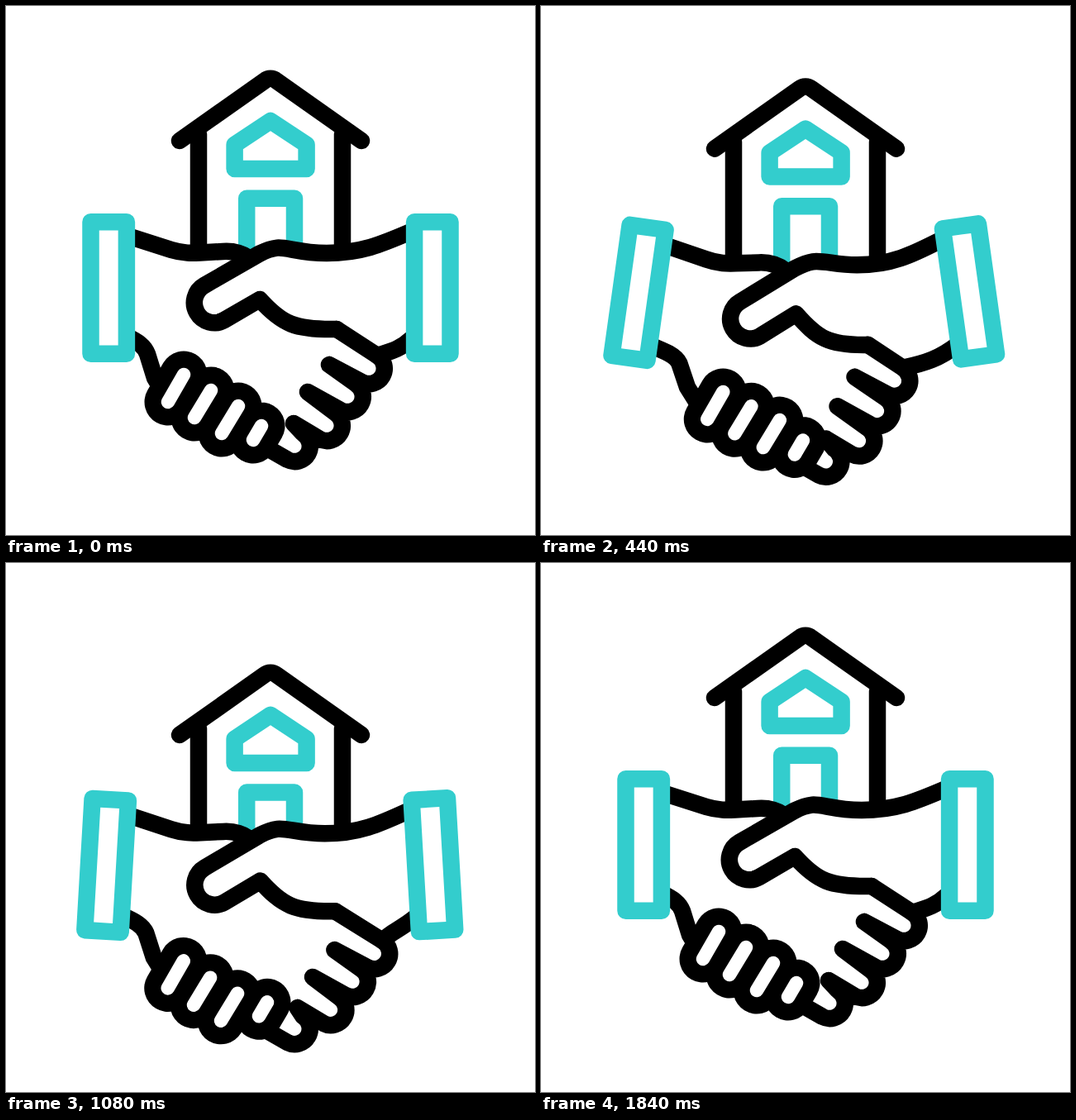
Recreate the animation shown at these times as an HTML page. Size 640 px wide and 640 px high, loop 1960 ms.

```html
<!DOCTYPE html>
<html lang="en">
<head>
<meta charset="utf-8">
<title>Handshake in front of a house</title>
<style>
  html, body { margin: 0; height: 100%; overflow: hidden; background: #fff; }
  svg { display: block; width: 100%; height: 100%; }
  svg * { stroke-linecap: round; stroke-linejoin: round; }
  .ink, .accent { fill: none; stroke: #000; stroke-width: 20.5; }
  .accent { stroke: #33cdcd; }
  .solid { fill: #fff; }
  .outer { stroke: #000; stroke-width: 57; }
  .inner { stroke: #fff; stroke-width: 16.5; }
</style>
</head>
<body>
<svg viewBox="0 0 640 640">
  <g id="house">
    <path class="ink" d="M233 155V312M407 155V312"/>
    <path class="ink" d="M210 163L313 90.3C317 87 323 87 327 90.3L430 163"/>
    <path class="accent" d="M276.6 197V167.8L320 139L363.6 167.8V197Z"/>
    <path class="accent" d="M291.2 318V232.7H349V318"/>
  </g>
  <path id="leftFill" fill="#fff"/>
  <path id="leftTop" class="ink"/>
  <path id="leftWrist" class="ink"/>
  <path id="rightWrist" class="ink"/>
  <path id="rightArm" class="ink solid"/>
  <path id="rightFingers" class="ink"/>
  <path id="leftOuter" class="outer"/>
  <path id="leftInner" class="inner"/>
  <rect id="leftCuff" class="accent solid" x="-21.7" y="-79.8" width="43.4" height="159.6"/>
  <rect id="rightCuff" class="accent solid" x="-21.7" y="-79.8" width="43.4" height="159.6"/>
</svg>
<script>
const LOOP = 1960, STEP = 40;
const el = id => document.getElementById(id);
const setPath = (id, d) => el(id).setAttribute('d', d);
const place = (id, transform) => el(id).setAttribute('transform', transform);

// Symmetric cubic-bezier(.55, 0, .45, 1)
function ease(x) {
  let lo = 0, hi = 1;
  for (let i = 0; i < 24; i++) {
    const s = (lo + hi) / 2, r = 1 - s;
    if (1.65 * s * r * r + 1.35 * s * s * r + s ** 3 < x) lo = s; else hi = s;
  }
  return lo * lo * (3 - 2 * lo);
}

function track(t, keys) {
  if (t <= keys[0][0]) return keys[0][1];
  for (let i = 1; i < keys.length; i++) {
    const [t0, v0] = keys[i - 1], [t1, v1] = keys[i];
    if (t < t1) return v0 + (v1 - v0) * ease((t - t0) / (t1 - t0));
  }
  return keys[keys.length - 1][1];
}

// Fingers pull in, push out a little too far, then settle
const slide = (t, delay, pull, push) =>
  track(t - delay, [[270, 0], [620, -pull], [1070, push], [1290, 0]]);

// Path points are written x,y,dx,dy where dx,dy is the shift of the bent pose
const LEFT_TOP = 'M150,279,0,-11 L200,295,0,-9.5 C215,299.5,0,-8.5 225,299,0,-8 235,298.5,1,-7.8 ' +
  'L262,297,2,-7 C275,296,2,-6.5 285,299,2,-6 294,305,2,-5';
const LEFT_WRIST = 'M146,399.5,-20,-11 C160,406.5,-13,-10 167,411,-5,-9 171,421,-5,-10 ' +
  'L180,450,-4,-10 L186,460,2,-1';
const RIGHT_ARM = 'M490,273,-6,-12.5 C455,288,-3,-10.5 430,299,-5,-5.5 388,299,-8,-5.7 ' +
  'C355,299,3,-5.7 340,291.5,2,-3.5 328,292.6,1,-2.6 C318,293.6,1,-1.8 310,298,0,-1 306,300,0,-1 ' +
  'L240,338,1.5,1.3 A24 24 0 0 0 264,380,1.5,.8 L307,355,2,-1.7 C334,385,0,-2.7 350,392,-3,.3 400,391,-6,.3';
const RIGHT_WRIST = 'M490,403,20,-17 C476,416,9,-11 465,418,0,-6 ';

const LEFT_FINGERS = [
  { top: [215, 446], tip: [196, 479], bend: [7, 3], delay: 180, pull: 4, push: 8 },
  { top: [248, 465], tip: [228, 498], bend: [8.4, 1], delay: 110, pull: 4, push: 8 },
  { top: [281, 484], tip: [261, 517], bend: [9.5, -.5], delay: 50, pull: 7, push: 8 },
  { top: [309, 508], tip: [299, 525], bend: [10.5, -1.5], delay: 260, pull: 14, push: 3.5 }
];
// "next" is the knuckle below the finger
const RIGHT_FINGERS = [
  { tip: [440, 439], next: [391, 434], bend: -5 },
  { tip: [414, 473], next: [365, 467], bend: -5 },
  { tip: [389, 508], next: [348, 505], bend: -4 },
  { tip: [350, 533], next: [318, 536], bend: -6 }
];

function draw(t) {
  const drop = track(t, [[40, 0], [820, 35.3], [1680, 0]]);
  const bend = track(t, [[40, 0], [680, 1], [1360, 0]]);
  const houseDrop = track(t, [[160, 0], [960, 46], [1840, 0]]);

  const at = (x, y, dx, dy) => `${(x + bend * dx).toFixed(2)} ${(y + drop + bend * dy).toFixed(2)}`;
  const morph = d => d.replace(/[-\d.]+(,[-\d.]+){3}/g, p => at(...p.split(',').map(Number)));

  place('house', `translate(0 ${houseDrop})`);
  place('leftCuff', `translate(${at(124.2, 341, -8.2, -17)}) rotate(${10.6 * bend})`);
  place('rightCuff', `translate(${at(515.8, 341, 3.6, -19)}) rotate(${-10.6 * bend})`);

  const leftTop = morph(LEFT_TOP);
  setPath('leftTop', leftTop);
  setPath('leftFill', leftTop + 'V400H150Z');
  setPath('leftWrist', morph(LEFT_WRIST));
  setPath('rightArm', morph(RIGHT_ARM));

  const leftLines = LEFT_FINGERS.map(f => {
    const s = slide(t, f.delay, f.pull, f.push);
    const end = ([x, y]) => at(x - .5 * s, y + .866 * s, ...f.bend);
    return `M${end(f.top)}L${end(f.tip)}`;
  }).join('');
  setPath('leftOuter', leftLines);
  setPath('leftInner', leftLines);

  let knuckle = at(400, 391, -6, .3), wristEnd;
  const rightLines = RIGHT_FINGERS.map((f, i) => {
    const s = slide(t, 60 * i, 16.5, 8);
    const end = ([x, y], dx = 0, dy = 0) => at(x + s + dx, y + .5 * s + dy, f.bend, 0);
    const start = knuckle, upper = end(f.tip, 9.25, -16);
    knuckle = end(f.next);
    wristEnd = wristEnd || upper;
    return `M${start}L${upper}A18.5 18.5 0 0 1 ${end(f.tip, -9.25, 16)}L${knuckle}`;
  }).join('');
  setPath('rightFingers', rightLines);
  setPath('rightWrist', morph(RIGHT_WRIST) + wristEnd);
}

const begin = performance.now();
function tick() {
  const t = (performance.now() - begin) % LOOP;
  draw(Math.floor(t / STEP) * STEP);
  requestAnimationFrame(tick);
}
tick();
</script>
</body>
</html>
```
